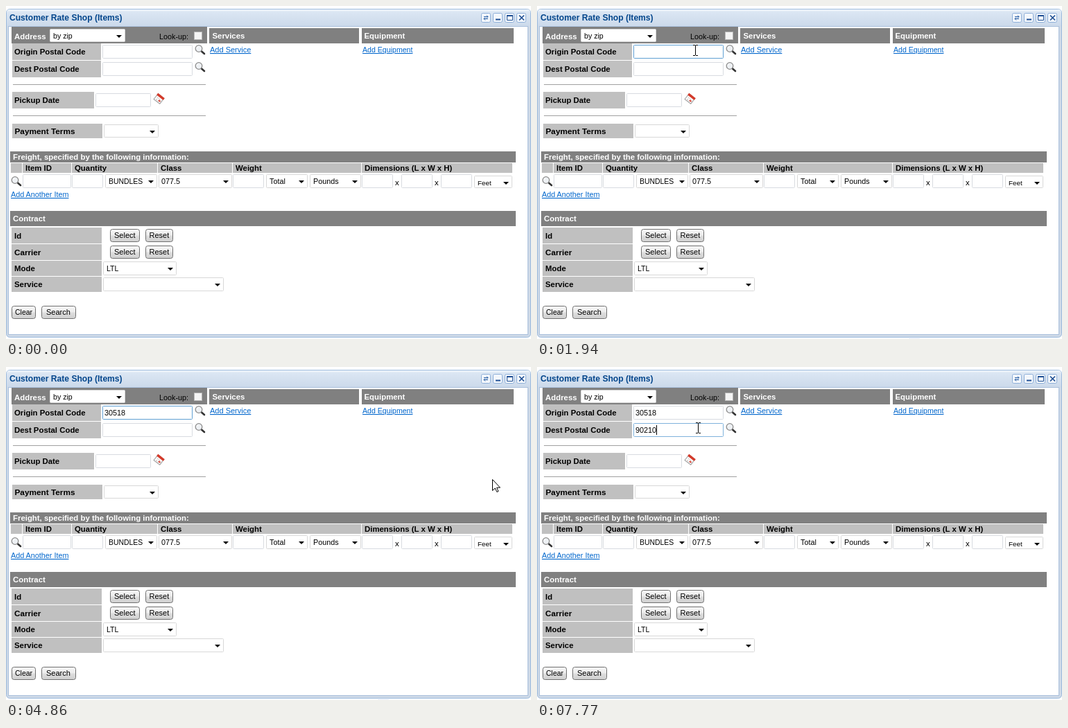
Animation, 757 px wide and 481 px high, one loop 8000 ms. Source, as an HTML page:

```html
<!DOCTYPE html>
<html lang="en">
<head>
<meta charset="utf-8">
<title>Customer Rate Shop</title>
<style>
html, body { margin: 0; width: 100%; height: 100%; overflow: hidden; background: #fff; }
svg { display: block; width: 757px; height: 481px; }
text { font: 10.8px "Liberation Sans", Arial, sans-serif; white-space: pre; }
.b { font-weight: bold; font-size: 11.4px; }
.w { fill: #fff; }
.link { fill: #06c; text-decoration: underline; }
</style>
</head>
<body>
<svg id="stage" viewBox="0 0 757 481">
  <defs>
    <linearGradient id="bar" x2="0" y2="1">
      <stop offset="0" stop-color="#f2f7fc"/><stop offset=".15" stop-color="#dbe6f3"/><stop offset="1" stop-color="#cbd9ea"/>
    </linearGradient>
    <linearGradient id="btn" x2="0" y2="1">
      <stop offset="0" stop-color="#f6f6f6"/><stop offset=".48" stop-color="#ececec"/>
      <stop offset=".52" stop-color="#dedede"/><stop offset="1" stop-color="#d0d0d0"/>
    </linearGradient>
    <g id="lens">
      <path d="M10 9.5L14 13" stroke="#333" stroke-width="2.6" stroke-linecap="round"/>
      <circle cx="6" cy="5.5" r="4.8" fill="#eef1f4" stroke="#8c8c8c" stroke-width="1.3"/>
      <path d="M3.2 5a3 3 0 0 1 2.5-2.4" fill="none" stroke="#fff"/>
    </g>
  </defs>
  <g id="form"></g>
  <rect id="trace" x="536" y="480" width="16" height="1" fill="#dfe8f6"/>
  <text id="origin" x="142" y="70"></text>
  <text id="dest" x="142" y="95"></text>
  <rect id="caret" width="1" height="14"/>
  <path id="arrow" d="M.5.5V16.5L4.3 13 6.8 18.5 9 17.6 6.6 12.2H11.5Z" fill="#fff" stroke="#000"/>
  <path id="beam" d="M-3.5.5h3m1 0h3M0 1V15M-3.5 15.5h3m1 0h3" fill="none" stroke="#000"/>
</svg>
<script>
const $ = id => document.getElementById(id);
const GREY = '#808080', LABEL = '#c0c0c0';
const parts = [];
const add = s => parts.push(s);
const rect = (x, y, x2, y2, fill, more = '') =>
  add(`<rect x="${x}" y="${y}" width="${x2 - x}" height="${y2 - y}" fill="${fill}" ${more}/>`);
const text = (x, y, s, cls = '', size = 0) =>
  add(`<text x="${x}" y="${y}" class="${cls}" ${size ? `style="font-size:${size}px"` : ''}>${s}</text>`);
const line = (d, stroke, width = 1) =>
  add(`<path d="${d}" fill="none" stroke="${stroke}" stroke-width="${width}"/>`);
const frame = (x, y, x2, y2, fill, stroke, r = 0, id = '') =>
  rect(x + .5, y + .5, x2 - .5, y2 - .5, fill, `stroke="${stroke}" rx="${r}" ${id && `id="${id}"`}`);

const label = (x, y, x2, y2, s, tx, size) => {
  rect(x, y, x2, y2, LABEL);
  text(tx, Math.round((y + y2) / 2) + 4, s, 'b', size);
};
const band = (x, y, x2, y2, s, tx, base) => {
  rect(x, y, x2, y2, GREY);
  text(tx, base, s, 'b w');
};
const field = (x, y, x2, id) => frame(x, y, x2, y + 20, '#fff', '#d8dbe0', 1, id);
const select = (x, y, x2, s, tx, size, h = 20) => {
  frame(x, y, x2, y + h, '#fff', '#d8d8d8', 1);
  add(`<path d="M${x2 - 13} ${y + 9}h8l-4 4z"/>`);
  text(tx, y + 14, s, '', size);
};
const button = (x, y, x2, s, tx, size) => {
  frame(x, y, x2, y + 19, 'url(#btn)', '#707070', 3);
  text(tx, y + 13, s, '', size);
};
const lens = (x, y) => add(`<use href="#lens" x="${x}" y="${y}"/>`);

// Window
frame(0, 4, 757, 479, '#ced9e7', '#9dbbdd', 5);
rect(1, 5, 756, 30, 'url(#bar)', 'rx="4"');
frame(3, 29, 753, 475, '#fff', '#a9c0dc');
add('<g fill="#04468c">');
text(5, 21, 'Customer Rate Shop (Items)', 'b', 12.1);
add('</g>');
for (let i = 0; i < 4; i++) frame(685 + i * 17, 10, 699 + i * 17, 24, '#f3f7fc', '#8fb0d9', 2);
line('M689 15.5h6m-2-2l2 2-2 2M695 18.5h-6m2-2l-2 2 2 2', '#2a5fa5');
line('M706 19.5h7', '#1f4f94', 2);
line('M722.5 14v6.5h8V14', '#1f4f94');
line('M722 14h9', '#1f4f94', 2);
line('M740 13.5l7 7m0-7l-7 7', '#1f4f94', 1.7);

// Address
band(8, 30, 290, 54, 'Address', 12, 48);
select(63, 33, 172, 'by zip', 68, 10.6, 19);
text(221, 48, 'Look-up:');
frame(271, 37, 283, 49, '#f4f4f4', '#b8b8b8');
label(9, 54, 137, 78, 'Origin Postal Code', 12);
label(9, 79, 137, 103, 'Dest Postal Code', 12);
field(139, 56, 269, 'originBox');
field(139, 81, 269, 'destBox');
lens(272, 56);
lens(272, 81);
line('M10 113.5H288M10 158.5H288', '#a0a0a0');
label(9, 124, 127, 148, 'Pickup Date', 12);
field(129, 126, 209);
add(`<g transform="translate(220.5 134) rotate(38)"><rect x="-5.5" y="-5" width="11" height="10" fill="#fff" stroke="#999"/>
  <path d="M-6-4H6" stroke="#d43a2a" stroke-width="3.4"/><path d="M-3 0H4M-3 3H3" stroke="#c9b8b4" stroke-dasharray="2 1"/>
  <path d="M1 2h3" stroke="#d43a2a" stroke-width="2"/></g>`);
label(9, 170, 139, 191, 'Payment Terms', 12.5, 11.8);
select(141, 171, 220, '', 0, 0, 19);

// Services and equipment
band(293, 32, 509, 54, 'Services', 297.5, 47);
band(513, 32, 732, 54, 'Equipment', 516.5, 47);
text(294, 67, 'Add Service', 'link', 11);
text(514, 67, 'Add Equipment', 'link', 10.6);

// Freight
band(6, 210, 735, 226, 'Freight, specified by the following information:', 10, 222);
rect(7, 227, 23, 241, LABEL);
[[24, 94, 'Item ID', 28], [95, 218, 'Quantity', 99], [219, 326, 'Class', 223],
 [327, 512, 'Weight', 331], [513, 730, 'Dimensions (L x W x H)', 517]]
  .forEach(([x, x2, s, tx]) => label(x, 227, x2, 241, s, tx));
lens(7, 246);
[[24, 94], [95, 140], [327, 372], [513, 558], [570, 615], [627, 672]].forEach(([x, x2]) => field(x, 243, x2));
select(143, 243, 218, 'BUNDLES', 148, 10.4);
select(220, 243, 326, '077.5', 224);
select(375, 243, 435, 'Total', 380);
select(438, 243, 512, 'Pounds', 443);
select(675, 245, 730, 'Feet', 680, 9.8, 18);
text(561, 259, 'x', '', 11.4);
text(618, 259, 'x', '', 11.4);
text(7, 276, 'Add Another Item', 'link');

// Contract
band(6, 296, 735, 318, 'Contract', 10, 311);
label(8, 320, 138, 343, 'Id', 12);
label(8, 344, 138, 367, 'Carrier', 12, 11.7);
label(8, 368, 138, 390, 'Mode', 12);
label(8, 391, 138, 413, 'Service', 12);
for (const y of [322, 346]) {
  button(150, y, 193, 'Select', 156, 11);
  button(201, y, 241, 'Reset', 206.5, 11);
}
select(140, 369, 246, 'LTL', 145, 10.5);
select(140, 392, 314, '', 0);
button(8, 433, 43, 'Clear', 13, 10.5);
button(51, 433, 101, 'Search', 58, 11);
$('form').innerHTML = parts.join('');

// Pointer stops: time, x, y, shape (a = arrow, i = text beam)
const pointer = [
  [0], [700, 544, 474, 'a'], [850, 536, 456, 'a'], [980, 514, 392, 'a'], [1120, 455, 328, 'a'],
  [1240, 396, 264, 'a'], [1400, 344, 207, 'a'], [1540, 273, 118, 'a'], [1670, 247.5, 83, 'i'],
  [1790, 237.5, 66, 'i'], [1940, 228.5, 56, 'i'], [2390, 480, 108, 'a'], [2510, 663, 148, 'a'],
  [2640, 666, 148, 'a'], [4860, 701, 162, 'a'], [4990, 672, 166, 'a'], [5130, 462, 119, 'a'],
  [5280, 340, 98, 'a'], [5400, 264.5, 80, 'i'], [5520, 243.5, 81, 'i'], [5640, 233.5, 80, 'i'],
  [5790], [5940, 232.5, 80, 'i']
];
const originKeys = [3310, 3450, 3740, 4000, 4120];
const destKeys = [6790, 6790, 7350, 7650, 7770];
const typed = (keys, t) => keys.filter(k => t >= k).length;
const within = (t, a, b) => t >= a && t < b;
const show = (id, on) => $(id).style.display = on ? '' : 'none';

function place(id, on, x, y) {
  show(id, on);
  if (on) $(id).setAttribute('transform', `translate(${x} ${y})`);
}

function draw(t) {
  const [, x, y, shape] = pointer.filter(p => t >= p[0]).pop();
  place('arrow', shape === 'a', x, y);
  place('beam', shape === 'i', x, y);
  show('trace', t >= 980);

  const n = typed(originKeys, t), m = typed(destKeys, t), onDest = t >= 5790;
  $('origin').textContent = '30518'.slice(0, n);
  $('dest').textContent = '90210'.slice(0, m);
  const blink = within(t, 2240, 2910) || within(t, 3310, 4710) || t >= 5280;
  place('caret', blink, 142 + 6 * (onDest ? m : n), onDest ? 84 : 59);
  $('originBox').setAttribute('stroke', within(t, 1790, 5790) ? '#5f9fd3' : '#d8dbe0');
  $('destBox').setAttribute('stroke', t >= 5400 ? '#7fb2dc' : '#d8dbe0');
}

const start = performance.now();
function tick() {
  draw((performance.now() - start) % 8000);
  requestAnimationFrame(tick);
}
tick();
</script>
</body>
</html>
```
